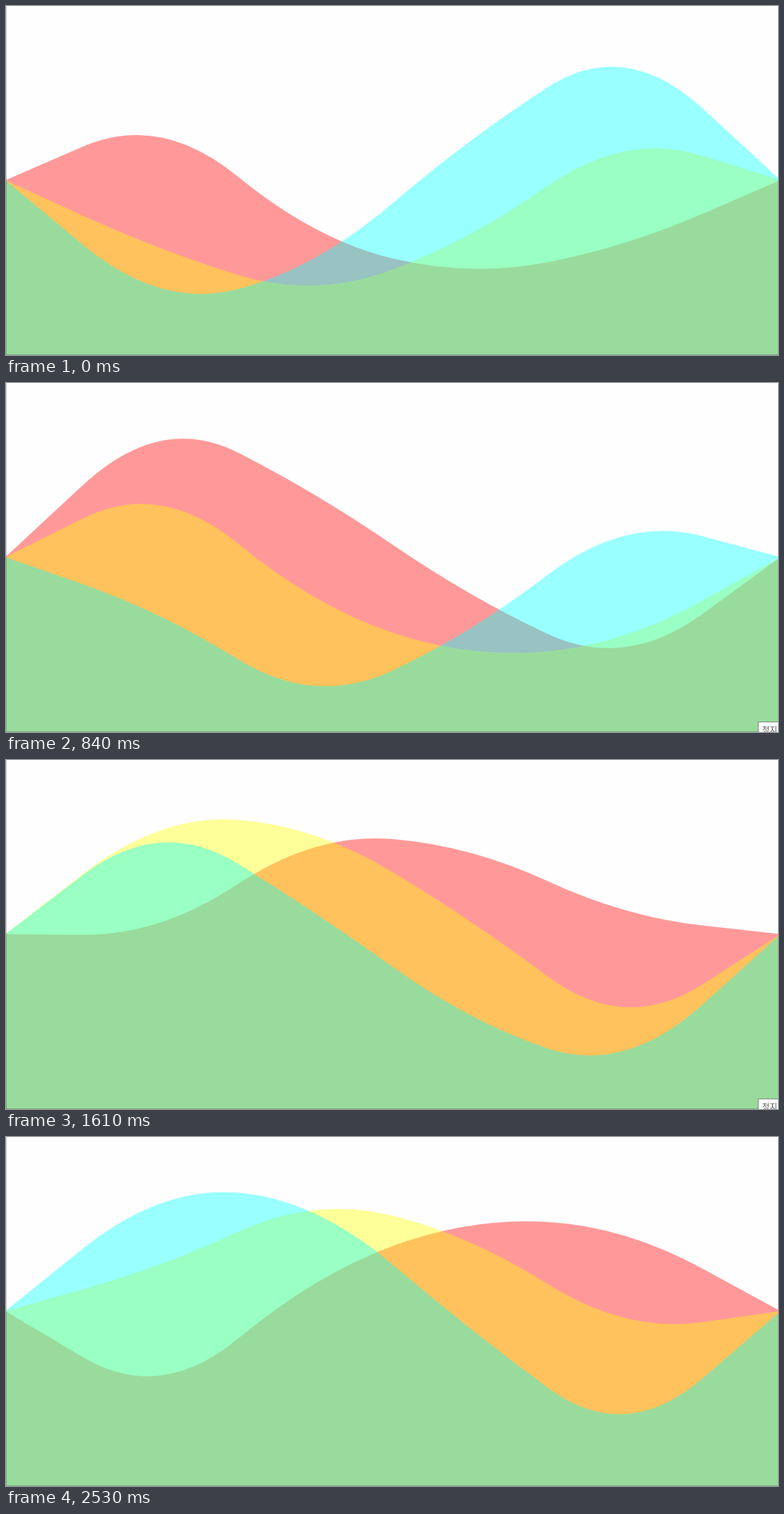
Write an HTML page with a canvas that moves like this. It is 1114 px wide and 503 px high and loops after 2.61 s.

```html
<!DOCTYPE html>
<html lang="ko">
<head>
<meta charset="utf-8">
<title>Waves</title>
<style>
  html, body { margin: 0; width: 100%; height: 100%; overflow: hidden; background: #fefefe; }
  canvas { display: block; }
</style>
</head>
<body>
<canvas id="stage" width="1114" height="503"></canvas>
<script>
const W = 1114, H = 503;
const LEFT = -1, RIGHT = 1117.5, MID = 251;   // the waves reach just past the stage
const GAP = (RIGHT - LEFT) / 5;
const LOOP = 2610, STEP = 76.7, LAST = 33;
const START = -0.485;        // phase of the first wave's first moving point
const TICKS_PER_STEP = 4.695, TICK = 0.1;

// Swing of the four inner points of each wave; the two ends stay at MID.
const waves = [
  { color: 'rgba(255,0,0,.4)', swing: [207.5, 175, 140, 164.7] },
  { color: 'rgba(255,255,0,.4)', swing: [207, 171.3, 147.7, 192] },
  { color: 'rgba(0,255,255,.4)', swing: [186.4, 218, 170, 210] },
];

const ctx = document.getElementById('stage').getContext('2d');

function drawWave({ color, swing }, phase) {
  const ys = [MID, ...swing.map((s, i) => MID + s * Math.sin(phase + i)), MID];
  ctx.beginPath();
  ctx.moveTo(LEFT, MID);
  for (let i = 0; i < 5; i++) {
    ctx.quadraticCurveTo(LEFT + i * GAP, ys[i], LEFT + (i + 0.5) * GAP, (ys[i] + ys[i + 1]) / 2);
  }
  ctx.lineTo(RIGHT, MID);
  ctx.lineTo(RIGHT, H);
  ctx.lineTo(LEFT, H);
  ctx.fillStyle = color;
  ctx.fill();
}

function drawTooltip() {
  ctx.fillStyle = '#fff';
  ctx.fillRect(1085, 488, 40, 30);
  ctx.strokeStyle = '#808080';
  ctx.strokeRect(1085.5, 488.5, 40, 30);
  ctx.fillStyle = '#575757';
  ctx.font = '12px "Noto Sans CJK KR", "Noto Sans CJK", sans-serif';
  ctx.fillText('정지', 1091, 505);
}

function draw(ms) {
  const step = Math.min(LAST, Math.floor((ms % LOOP + 10.5) / STEP));
  const phase = START + TICK * Math.round(step * TICKS_PER_STEP);

  ctx.fillStyle = '#fefefe';
  ctx.fillRect(0, 0, W, H);
  waves.forEach((wave, i) => drawWave(wave, phase + i));

  ctx.fillStyle = 'rgba(0,0,0,.22)';
  ctx.fillRect(0, 0, 1, H);
  ctx.fillRect(1, H - 1, W - 1, 1);
  if (step >= 3 && step < LAST) drawTooltip();
}

const begin = performance.now();
function frame() {
  draw(performance.now() - begin);
  requestAnimationFrame(frame);
}
frame();
</script>
</body>
</html>
```
